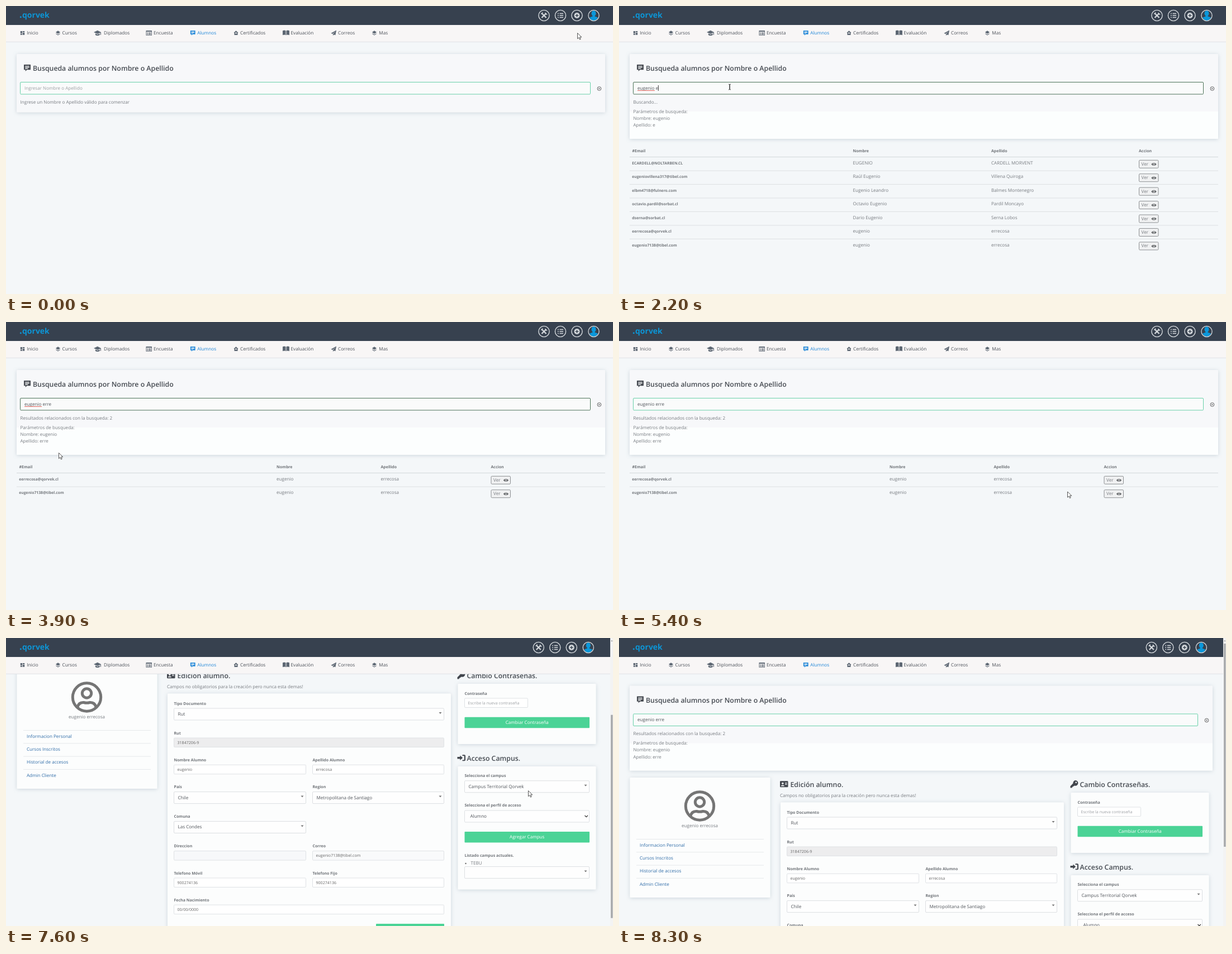
Recreate the animation shown at these times as an HTML page. Size 1086 by 516 pixels, loop 8900 ms.

```html
<!DOCTYPE html>
<html lang="es">
<head>
<meta charset="utf-8">
<title>Busqueda alumnos</title>
<style>
html, body { margin: 0; width: 100%; height: 100%; overflow: hidden; background: #f4f7f9; }
svg { display: block; width: 1086px; height: 516px; }
text { font: 8.08px "Open Sans", "Noto Sans", sans-serif; fill: #777b80; white-space: pre; text-rendering: geometricPrecision; }
.nav { font-size: 8.2px; fill: #4b5058; }
.on { fill: #1f86d8; }
.h { font-size: 12.3px; font-weight: 600; fill: #454a51; }
.b { font-size: 7px; font-weight: 700; fill: #707479; }
.mail { font-size: 6.8px; font-weight: 700; fill: #75797e; }
.in { font-size: 7.1px; fill: #666; }
.ph { fill: #9b9fa3; }
.sel { fill: #50545a; }
.link { fill: #2f6ca8; }
.btn { fill: #fff; text-anchor: middle; }
.mid { text-anchor: middle; }
.logo { font-size: 14px; font-weight: 700; fill: #0c95d6; }
</style>
</head>
<body>
<svg viewBox="0 0 1086 516" xmlns="http://www.w3.org/2000/svg">
  <defs>
    <filter id="soft" x="-5%" y="-20%" width="110%" height="140%">
      <feDropShadow dx="0" dy="1" stdDeviation="3.5" flood-color="#7f95a3" flood-opacity=".34"/>
    </filter>
  </defs>
  <rect width="1086" height="516" fill="#f4f7f9"/>
  <g id="page"></g>
  <g id="head"></g>
  <g id="tools"></g>
  <g id="bar"></g>
  <g id="cursor"></g>
</svg>
<script>
const LOOP = 8900, STEP = 100;
const $ = id => document.getElementById(id);

const ICONS = {
  dash: 'M2 3h9v10H2zM13 3h9v6h-9zM13 11h9v10h-9zM2 15h9v6H2z',
  layers: 'M12 1l11 7.500-11 7.500L1 8.500zM4 14.500l8 5.500 8-5.500 3 1.500-11 7.500L1 16z',
  cap: 'M12 4L0 9.500 12 15l9-4.200V18h2V9.500zM5 13.800V18c2 3 12 3 14 0v-4.200L12 17z',
  news: 'M0 2h24v20H0zM2 7v13h20V7zM4 9h4v2H4zM10 9h10v2H10zM4 12.500h4v2H4zM10 12.500h10v2H10zM4 16h4v2H4zM10 16h10v2H10z',
  chat: 'M1 1h22v17H11l-5 5v-5H1zM5 5v2.500h14V5zM5 9v2.500h14V9zM5 13v2h9v-2z',
  home: 'M12 1l11 10h-3v11H4V11H1zM12 9a3.500 3.500 0 100 7 3.500 3.500 0 000-7z',
  book: 'M0 4c4-2 8-2 11 0v16c-3-2-7-2-11 0zM13 4c3-2 7-2 11 0v16c-4-2-8-2-11 0z',
  plane: 'M23 1L1 13l6 3L19 6 9 17v6l4-4 6 2z',
  key: 'M15 1a8 8 0 11-3 15.400L9 19H7v2H5v2H0v-5l8-8A8 8 0 0115 1zM17 5a2.200 2.200 0 100 4.400 2.200 2.200 0 000-4.400z',
  enter: 'M8 5l8 7-8 7v-4H0V9h8zM15 3h6a3 3 0 013 3v12a3 3 0 01-3 3h-6v-3h5.500V6H15z',
  card: 'M2 3h20a2 2 0 012 2v14a2 2 0 01-2 2H2a2 2 0 01-2-2V5a2 2 0 012-2zM8 7a3 3 0 100 6 3 3 0 000-6zM3 18h10c0-4-10-4-10 0zM15 8v2h6V8zM15 12v2h6v-2z',
  eye: 'M0 12C6 3 18 3 24 12 18 21 6 21 0 12zM12 6.500a5.500 5.500 0 100 11 5.500 5.500 0 000-11zM12 9a3 3 0 100 6 3 3 0 000-6z'
};

const text = (x, y, s, cls = '') => `<text x="${x}" y="${y}" class="${cls}">${s}</text>`;
const box = (x, y, x2, y2, fill, line = 'none', r = 1.5) =>
  `<rect x="${x}" y="${y}" width="${x2 - x}" height="${y2 - y}" rx="${r}" fill="${fill}" stroke="${line}"/>`;
const rule = (x, x2, y, color = '#dde0e3') => `<path d="M${x} ${y}H${x2}" stroke="${color}"/>`;
const icon = (name, x, y, size, color = '#5d6773') =>
  `<path transform="translate(${x} ${y}) scale(${size / 24})" d="${ICONS[name]}" fill="${color}" fill-rule="evenodd"/>`;
const panel = (x, y, x2, y2, fill = '#fcfdfd') => `<g filter="url(#soft)">${box(x, y, x2, y2, fill)}</g>`;

// value at time t along [time, ...values] points
function along(points, t) {
  let a = points[0];
  for (const b of points) {
    if (b[0] > t) return a.slice(1).map((v, i) => v + (b[i + 1] - v) * Math.max(0, t - a[0]) / (b[0] - a[0] || 1));
    a = b;
  }
  return a.slice(1);
}
// last entry whose time has been reached
const latest = (list, t) => list.filter(e => e[0] <= t).pop();

const QUERY = 'eugenio erre';
const KEYS = [1000, 1100, 1200, 1300, 1400, 1500, 1600, 1800, 2200, 2900, 3000, 3200];
const PEOPLE = [
  ['ECARDELL@NOLTARBEN.CL', 'EUGENIO', 'CARDELL MORVENT'],
  ['eugeniovillena317@tibel.com', 'Raúl Eugenio', 'Villena Quiroga'],
  ['elbm4718@fulnero.com', 'Eugenio Leandro', 'Balmes Montenegro'],
  ['octavio.pardil@sorbat.cl', 'Octavio Eugenio', 'Pardil Moncayo'],
  ['dserna@sorbat.cl', 'Dario Eugenio', 'Serna Lobos'],
  ['eerrecosa@qorvek.cl', 'eugenio', 'errecosa'],
  ['eugenio7138@tibel.com', 'eugenio', 'errecosa'],
  ['mlopera@sorbat.cl', 'Eugenia', 'Lopera Ruz'],
  ['egamir52@tibel.com', 'Eugenia', 'Gamir Tolosa']
];
const exact = PEOPLE.slice(0, 7);
const RESULTS = [
  [1500, PEOPLE],
  [2000, exact],
  [2500, exact.filter(p => /e/i.test(p[2]))],
  [3300, exact.filter(p => p[2].startsWith('erre'))]
];
const WIDE = [418.5, 666, 930], NARROW = [484, 670.5, 867.5];

const MOVES = [
  [0, 1022.5, 48.5], [200, 900, 56], [400, 590, 74], [500, 308, 94], [600, 212, 140], [700, 198, 145],
  [3400, 198, 145], [3500, 278, 190], [3600, 335, 227], [3700, 250, 245], [3900, 94.5, 234.5],
  [4100, 58, 222], [4300, 25, 196], [4700, 25, 196], [5000, 180, 252], [5200, 520, 318], [5300, 690, 322],
  [5400, 802.5, 304], [5500, 850, 305], [5600, 879, 304], [6200, 891, 303], [7000, 891, 303],
  [7100, 892.5, 307], [7300, 892.5, 307], [7700, 948.5, 262.5]
];
const SHAPES = {
  arrow: '<path d="M0 0v10.2l2.4-2.2 1.6 3.6 1.7-.8-1.6-3.5h3.200z" fill="#fff" stroke="#2b2b2b" stroke-width=".8"/>',
  beam: '<path d="M-2-5q2 0 2 1.200v7.600q0 1.200-2 1.200M2-5q-2 0-2 1.200v7.600q0 1.200 2 1.200" fill="none" stroke="#222" stroke-width=".9"/>',
  hand: '<path d="M-1 1q1-1.600 2 0v4l5 1.200q1 .4 .8 1.600l-.8 5h-5.500l-3.400-5q.4-1.400 2 0z" fill="#fff" stroke="#2b2b2b" stroke-width=".8"/>'
};
const POINTERS = [[0, 'arrow'], [600, 'beam'], [3500, 'arrow'], [5600, 'hand'], [7100, 'beam'], [7400, 'arrow'], [8300, '']];
const BORDERS = [[0, '#69d0a9'], [700, '#4c7358'], [4400, '#5aa280'], [4500, '#69d0a9']];
const SCROLL = [[7300, 0], [7400, 35], [7500, 120], [7600, 195], [7700, 219.7], [8000, 219.7], [8100, 140], [8200, 40], [8300, 0]];

function searchCard(t, right) {
  const n = KEYS.filter(k => k <= t).length;
  const typed = QUERY.slice(0, n), [first, last = ''] = typed.split(' ');
  const found = latest(RESULTS, t);
  const bottom = n ? 238 : 190.5;
  const focused = t >= 700 && t < 4400;
  let out = panel(19, 86, right, bottom, '#f7f8fa');
  if (n) out += box(19, 189, right, 238, '#fcfefe');
  out += icon('chat', 31.5, 104.5, 13, '#42464d') + text(48, 116, 'Busqueda alumnos por Nombre o Apellido', 'h');
  out += box(25.5, 136.5, right - 26.5, 158, '#fafbfb', latest(BORDERS, t)[1]);
  out += n ? `<text id="typed" x="33" y="149.700" class="sel">${typed}</text>` : text(33, 149.7, 'Ingresar Nombre o Apellido', 'ph');
  if (focused && typed.includes(' ')) out += '<path d="M33 151.500h31" stroke="#e0574f" stroke-width=".9"/>';
  if (focused) out += '<path id="caret" stroke="#222" stroke-width=".9"/>';
  const cx = right - 10.6;
  out += `<g fill="none" stroke="#555" stroke-width=".9"><circle cx="${cx}" cy="148" r="3.400"/><path d="M${cx - 1.3} 146.700l2.600 2.600m0-2.600l-2.600 2.600"/></g>`;
  if (!n) return out + text(25.5, 174.5, 'Ingrese un Nombre o Apellido válido para comenzar');
  const busy = !found || KEYS[n - 1] > found[0];
  out += text(25.5, 174.5, busy ? 'Buscando...' : 'Resultados relacionados con la busqueda: ' + found[1].length);
  return out + text(25.5, 191.5, 'Parámetros de busqueda:') + text(25.5, 203.7, 'Nombre: ' + first) + text(25.5, 216, 'Apellido: ' + last);
}

function table(t) {
  const found = latest(RESULTS, t);
  if (!found) return '';
  const rows = found[1], cols = rows.length > 2 ? WIDE : NARROW;
  let out = text(23.5, 262.3, '#Email', 'b');
  ['Nombre', 'Apellido', 'Accion'].forEach((s, i) => out += text(cols[i], 262.3, s, 'b'));
  out += rule(19, 1072, 270.5, '#d3d7da');
  rows.forEach(([mail, name, surname], i) => {
    const y = 24.45 * i, x = cols[2];
    const over = i === 1 && t >= 5700, down = over && t === 6700;
    if (i) out += rule(19, 1072, 270.7 + y);
    out += text(23.3, 283.8 + y, mail, 'mail') + text(cols[0], 283.8 + y, name) + text(cols[1], 283.8 + y, surname);
    out += box(x + .5, 276.3 + y, x + 35, 290.3 + y, down ? '#d3d5d7' : over ? '#e5e6e8' : '#f0f1f2', '#8c8f92');
    out += text(x + 4.5, 285.7 + y, 'Ver') + icon('eye', x + 22.5, 279 + y, 9, '#4a4d50');
  });
  return out;
}

const label = (x, y, s) => text(x, y, s, 'b');
const input = (x, x2, y, s, fill = '#fff', cls = 'in') => box(x, y, x2, y + 16.5, fill, '#dfe2e5') + text(x + 6, y + 10.6, s, cls);
const select = (x, x2, y, s) => box(x, y, x2, y + 21, '#fefefe', '#dcdfe2') + text(x + 7, y + 12.9, s, 'sel') +
  `<path d="M${x2 - 9} ${y + 7}h5l-2.500 3z" fill="#777"/>`;
const button = (x, x2, y, s) => box(x, y, x2, y + 19.5, '#4bd396', 'none', 1) + text((x + x2) / 2, y + 12.2, s, 'btn');
const title = (x, y, s, name) => icon(name, x, y - 12.5, 14.5, '#42464d') + text(x + 17, y, s, 'h');

function profile() {
  const A = 300.5, B = 536.5, C = 548.5, D = 783.5, E = 820.5, F = 1043.5, user = 'eugenio errecosa';
  let out = panel(19.5, 250, 270.5, 465);
  out += `<g fill="none" stroke="#757575" stroke-width="5"><circle cx="144.500" cy="301" r="25.200"/>
    <circle cx="144.500" cy="294" r="8.200"/><path d="M128 319q2-9 11-8.500 5.500 1.500 11 0 9-.5 11 8.500"/></g>`;
  out += text(144.5, 338.6, user, 'mid');
  ['Informacion Personal', 'Cursos Inscritos', 'Historial de accesos', 'Admin Cliente'].forEach((s, i) =>
    out += rule(31, 259, 360.5 + 23.3 * i, '#e6e9eb') + text(37, 373.7 + 23.35 * i, s, 'link'));

  out += title(288, 267, '', 'card') + text(306.5, 267, 'Edición alumno.', 'h');
  out += text(288, 284.5, 'Campos no obligatorios para la creación pero nunca esta demas!');
  out += panel(289, 294.5, 796, 764);
  out += label(A, 314.7, 'Tipo Documento') + select(A, D, 321, 'Rut');
  out += label(A, 367.6, 'Rut') + input(A, D, 374, '31847206-9', '#ededee');
  out += label(A, 415.8, 'Nombre Alumno') + input(A, B, 422.3, 'eugenio');
  out += label(C, 415.8, 'Apellido Alumno') + input(C, D, 422.3, 'errecosa');
  out += label(A, 464.4, 'País') + select(A, B, 470.6, 'Chile');
  out += label(C, 464.4, 'Region') + select(C, D, 470.6, 'Metropolitana de Santiago');
  out += label(A, 517.2, 'Comuna') + select(A, B, 523.5, 'Las Condes');
  out += label(A, 570.3, 'Direccion') + input(A, B, 576.6, '', '#f7f8fa');
  out += label(C, 570.3, 'Correo') + input(C, D, 576.6, 'eugenio7138@tibel.com', '#f9fafb');
  out += label(A, 618.6, 'Telefono Móvil') + input(A, B, 625, '900274136');
  out += label(C, 618.6, 'Telefono Fijo') + input(C, D, 625, '900274136');
  out += label(A, 667, 'Fecha Nacimiento') + input(A, D, 673.2, '00/00/0000');
  out += button(662, 784, 707, 'Editar Información Personal');

  out += title(807.5, 267, 'Cambio Contraseñas.', 'key') + panel(808.5, 277, 1055.5, 385);
  out += label(E, 296.7, 'Contraseña') + input(E, 933.5, 303, 'Escribe la nueva contraseña', '#fff', 'in ph');
  out += button(820.5, 1044, 336.7, 'Cambiar Contraseña');
  out += title(807.5, 415, 'Acceso Campus.', 'enter') + panel(808.5, 425, 1055.5, 645.5);
  out += label(E, 444.4, 'Selecciona el campus') + select(E, F, 450.8, 'Campus Territorial Qorvek');
  out += label(E, 497.4, 'Selecciona el perfil de acceso') + box(E, 504, F, 525, '#fefefe', '#dcdfe2') + text(830.5, 517, 'Alumno', 'sel');
  out += '<path d="M1035.500 513l2.700 2.700 2.700-2.700" fill="none" stroke="#333" stroke-width="1.200"/>';
  out += button(820.5, 1044, 542, 'Agregar Campus');
  out += label(E, 586.8, 'Listado campus actuales.') + '<circle cx="822.500" cy="599" r="1.200" fill="#666"/>' + text(831.5, 601, 'TEBU');
  return out + select(E, F, 604.6, '');
}

function header() {
  const items = [['Inicio', 37.3, 'dash', 25, 9], ['Cursos', 100.5, 'layers', 88.5, 9], ['Diplomados', 175, 'cap', 157, 13.5],
    ['Encuesta', 264, 'news', 250.5, 10.5], ['Alumnos', 342.3, 'chat', 329.5, 9.5], ['Certificados', 419, 'home', 407, 9],
    ['Evaluación', 509.5, 'book', 495, 12], ['Correos', 594, 'plane', 581, 10.5], ['Mas', 667.3, 'layers', 654.5, 9]];
  let out = box(0, 34, 1086, 64, '#f8f6f6', 'none', 0) + rule(0, 1086, 64.3, '#dfe2e5') + box(0, 0, 1086, 34, '#37414f', 'none', 0);
  out += '<circle cx="26.300" cy="19.800" r="1.500" fill="#0c95d6"/>' + text(29, 21, 'qorvek', 'logo');
  items.forEach(([s, x, name, ix, size]) => {
    const on = s === 'Alumnos';
    out += icon(name, ix, 48.3 - size / 2, size, on ? '#1f86d8' : undefined) + text(x, 51.2, s, on ? 'nav on' : 'nav');
  });
  return out;
}

function toolIcons() {
  const ring = x => `<circle cx="${x}" cy="17" r="9.600"/>`;
  return `<g fill="none" stroke="#d5d9dd" stroke-width="1.400">${[962.5, 992, 1021.5].map(ring).join('')}
    <path d="M959 13.500l7.500 7.500M966.500 13l-8 8" stroke-width="2.300"/><path d="M957.300 14.500l3-3M964.800 12l1.500 2.800 2 .2" />
    <path d="M990.500 13.500h6.500M990.500 17h6.500M990.500 20.500h6.500M987 13.500h1.700M987 17h1.700M987 20.500h1.700" stroke-width="1.500"/></g>
    <circle cx="1021.500" cy="17" r="5" fill="#d5d9dd"/><path d="M1018.700 17h5.600M1021.500 14.200v5.600" stroke="#37414f" stroke-width="1.400"/>
    <g fill="#0b97da"><ellipse cx="1051.500" cy="13.200" rx="4" ry="5"/><path d="M1049.500 16h4v2.500l5.500 2.300q-2.800 5.200-7.500 5.200t-7.500-5.200l5.500-2.300z"/></g>
    <g fill="none" stroke="#d5d9dd" stroke-width="1.300">${ring(1051.5)}</g>`;
}

function scrollbar(y) {
  const top = 10 + y * .655;
  return box(1081, 0, 1086, 516, '#f3f3f3', 'none', 0) + box(1082, top, 1085.6, Math.min(top + 364, 514), '#a9abad', 'none', 0) +
    '<path d="M1082.300 6l1.500-2 1.500 2z" fill="#888"/>';
}

$('head').innerHTML = header();
$('tools').innerHTML = toolIcons();
const form = profile();

function draw(t) {
  const edit = t >= 7100;
  const y = along(SCROLL, t)[0];
  $('page').innerHTML = edit
    ? `<g transform="translate(0 ${-y})"><g transform="translate(0 -.5)">${searchCard(t, 1062)}</g>${form}</g>`
    : searchCard(t, 1072) + table(t);
  $('tools').setAttribute('transform', `translate(${edit ? -9.7 : 0} 0)`);
  $('bar').innerHTML = edit ? scrollbar(y) : '';

  const caret = $('caret');
  if (caret) {
    const lastKey = Math.max(700, ...KEYS.filter(k => k <= t));
    const x = 33.4 + ($('typed') ? $('typed').getComputedTextLength() : 0);
    if ((t - lastKey) % 1000 < 500) caret.setAttribute('d', `M${x} 142v10`);
  }
  const shape = latest(POINTERS, t)[1], [cx, cy] = along(MOVES, t);
  $('cursor').innerHTML = SHAPES[shape] || '';
  $('cursor').setAttribute('transform', `translate(${cx} ${cy})`);
}

const start = performance.now();
let shown = -1;
function tick(now) {
  const t = Math.floor(Math.max(0, now - start) % LOOP / STEP) * STEP;
  if (t !== shown) draw(shown = t);
  requestAnimationFrame(tick);
}
draw(shown = 0);
requestAnimationFrame(tick);
</script>
</body>
</html>
```
